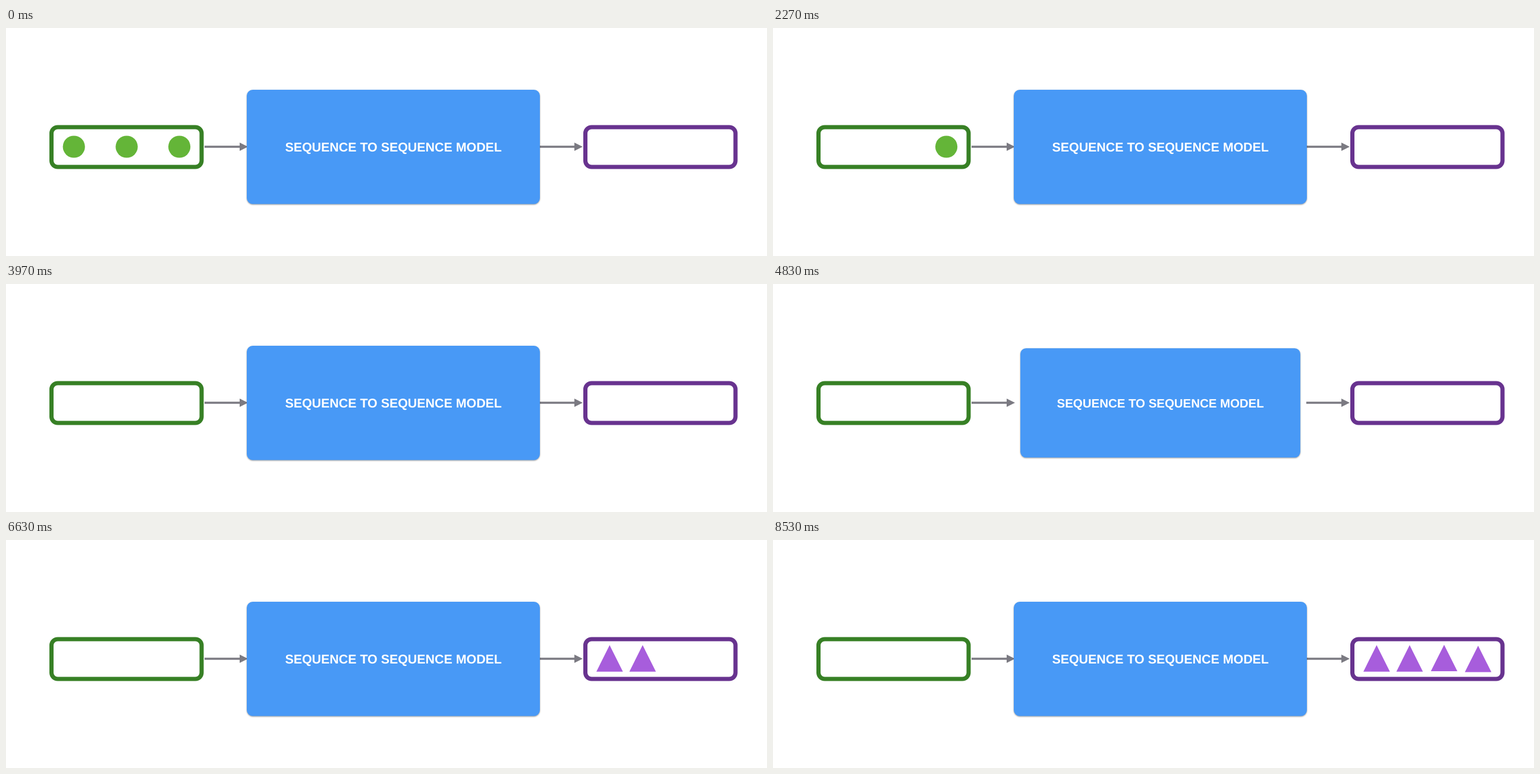
Animation of 1280x384 px, one loop 8.56 s. Source, as an HTML page:

```html
<!DOCTYPE html>
<html lang="en">
<head>
<meta charset="utf-8">
<title>Sequence to sequence model</title>
<style>
  html, body { margin: 0; width: 100%; height: 100%; overflow: hidden; background: #fff; }
  svg { display: block; width: 100vw; height: 100vh; }
  .frame { fill: #fff; stroke-width: 7; }
  .arrow { stroke: #7b7a82; stroke-width: 3.6; }
  .arrow path { fill: #7b7a82; stroke: none; }
  #model rect { fill: #4899f6; filter: drop-shadow(0 1px 1.2px rgba(0, 0, 0, .4)); }
  #model text {
    font: bold 21.4px "Liberation Sans", Arial, sans-serif;
    fill: #fff; text-anchor: middle; text-rendering: geometricPrecision;
  }
</style>
</head>
<body>
<svg viewBox="0 0 1280 384">
  <rect class="frame" x="76.5" y="167" width="252.5" height="67" rx="10.5" stroke="#378025"/>
  <rect class="frame" x="974.5" y="167" width="252.5" height="67" rx="10.5" stroke="#68338f"/>
  <g class="arrow" transform="translate(334 200)"><path d="M59-7 73 0 59 7z"/><line x2="60"/></g>
  <g class="arrow" transform="translate(897 200)"><path d="M59-7 73 0 59 7z"/><line x2="60"/></g>
  <g id="items"></g>
  <g id="model">
    <rect x="405" y="104" width="493" height="192.5" rx="10"/>
    <text x="651.7" y="208">SEQUENCE TO SEQUENCE MODEL</text>
  </g>
</svg>
<script>
const LOOP = 8560, MOVE = 400, PULSE = 300, DIP = 0.05;
const HUB = [651.5, 200.2];
const items = document.getElementById('items');
const model = document.getElementById('model');

function add(tag, attrs) {
  const el = document.createElementNS('http://www.w3.org/2000/svg', tag);
  for (const k in attrs) el.setAttribute(k, attrs[k]);
  return items.appendChild(el);
}

const circle = () => add('circle', { r: 18.6, fill: '#64b538' });
const triangle = () => add('path', { d: 'M0-22.3 22.3 22.3H-22.3z', fill: '#a75ddc' });

// Inputs slide behind the model, which then pulses.
const inputs = [[114.2, 200], [203, 200], [291.6, 200]].map((p, i) =>
  ({ el: circle(), from: p, to: HUB, start: 785 + 795 * i }));

// The model pulses, then each output slides out from behind it.
const outputs = [[1015.3, 199.4], [1070.8, 199.4], [1128.8, 198.7], [1186, 200.2]].map((p, i) =>
  ({ el: triangle(), from: HUB, to: p, start: 4996 + 800 * i }));

const moves = [...inputs, ...outputs];
const pulses = [...inputs.map(m => m.start + 396), ...outputs.map(m => m.start - 346)];

const clamp = v => Math.min(1, Math.max(0, v));
const ease = p => p < 0.5 ? 2 * p * p : 1 - 2 * (1 - p) ** 2;

function draw(t) {
  for (const { el, from, to, start } of moves) {
    const e = ease(clamp((t - start) / MOVE));
    const [x, y] = from.map((v, k) => v + (to[k] - v) * e);
    el.setAttribute('transform', `translate(${x} ${y})`);
  }
  let scale = 1;
  for (const start of pulses) {
    scale -= DIP * Math.sin(Math.PI * clamp((t - start) / PULSE)) ** 2;
  }
  const [x, y] = HUB;
  model.setAttribute('transform', `translate(${x} ${y}) scale(${scale}) translate(${-x} ${-y})`);
}

const begin = performance.now();
function tick() {
  draw((performance.now() - begin) % LOOP);
  requestAnimationFrame(tick);
}
tick();
</script>
</body>
</html>
```
